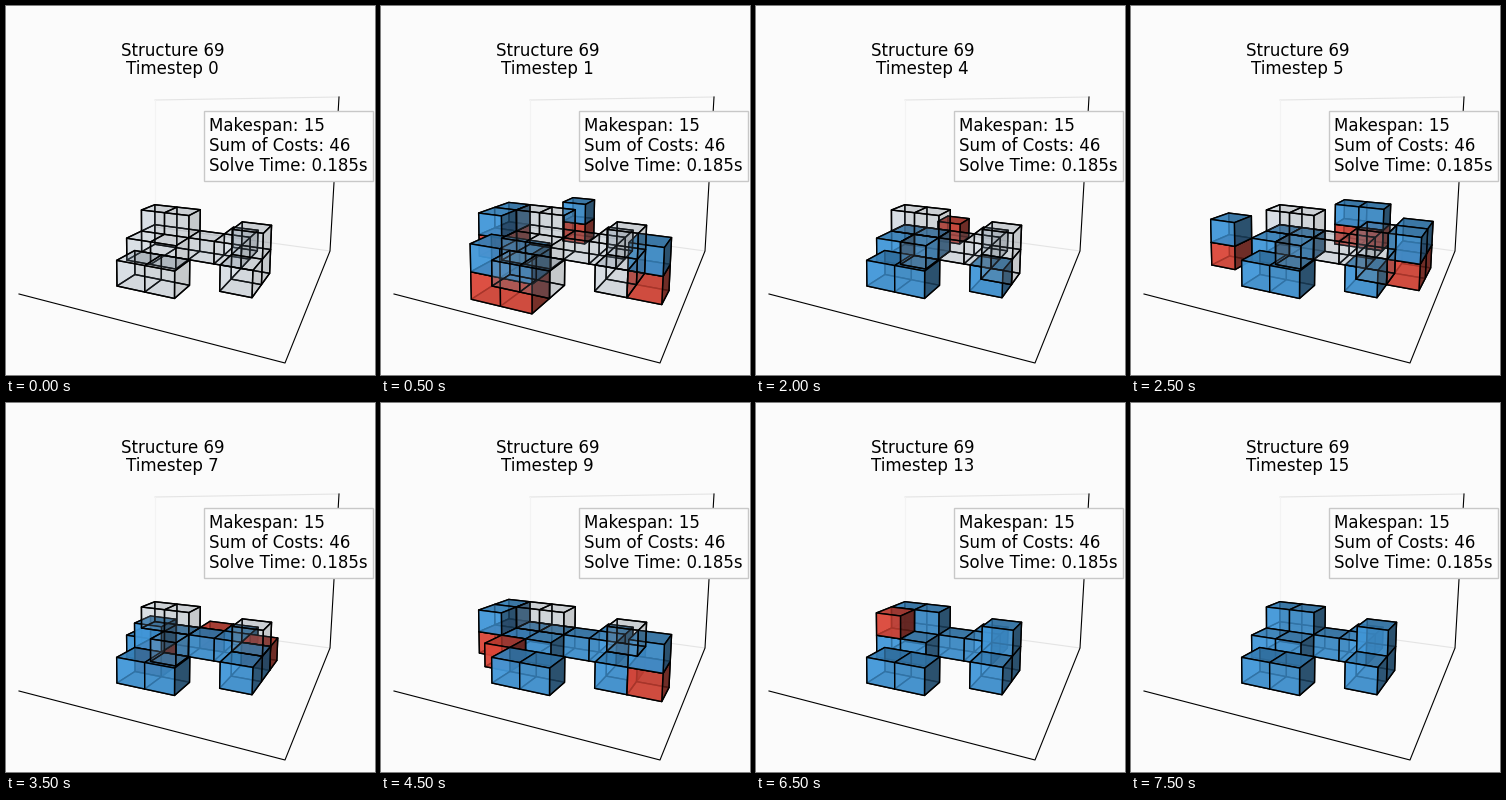
Animation of 369 by 369 pixels, one loop 8000 ms. Source, as a matplotlib script:

```python
import itertools

import numpy as np
import matplotlib.pyplot as plt
from matplotlib.animation import FuncAnimation
from matplotlib.collections import PolyCollection
from matplotlib.patches import Rectangle

SIZE, DPI = 369, 100
STEPS, STEP_MS = 16, 500

# Perspective camera: screen origin, axis vanishing points, and their weights.
ORIGIN = np.array([111, 280, 1])
VANISHING = np.array([[-682, 108, 1], [379, 108, 1], [150, 3100, 1]])
WEIGHTS = np.array([-0.0338, 0.0716, -0.0090])

LEFT, RIGHT, FRONT, BACK = (-1, 0, 0), (1, 0, 0), (0, -1, 0), (0, 1, 0)
DOWN, UP = (0, 0, -1), (0, 0, 1)
FAR_TO_NEAR = [BACK, LEFT, DOWN, UP, RIGHT, FRONT]
LIGHT = np.array([-0.67, -0.67, 0.17])
STYLES = {  # base colour and opacity
    "goal": ((0.58, 0.68, 0.77), 0.15),
    "block": ((0.29, 0.67, 0.96), 0.76),
    "robot": ((0.97, 0.31, 0.25), 0.76),
}


def add(a, b):
    return tuple(p + q for p, q in zip(a, b))


def inside(cell):
    return -2 <= cell[0] <= 4 and -1 <= cell[1] <= 5


class Trip:
    """A robot enters at the border, places a block from one side, and leaves."""

    def __init__(self, start, goal, side, way=None, hold=0):
        stand = add(goal, side)
        outward = [stand]
        cell = add((stand[0], stand[1], 0), way or side)
        while inside(cell):
            outward.append(cell)
            cell = add(cell, way or side)
        inward = [outward[-1]] * hold + outward[::-1]
        self.start, self.goal = start, goal
        self.drop = start + len(inward)
        self.path = inward + outward

    def robot(self, step):
        index = step - self.start
        return self.path[index] if 0 <= index < len(self.path) else None


TRIPS = [
    *(Trip(1, (x, 0, 0), FRONT) for x in (0, 1)),
    *(Trip(1, (-1, y, 0), LEFT) for y in (2, 3)),
    Trip(1, (3, 1, 0), RIGHT),
    Trip(1, (0, 3, 0), BACK),
    *(Trip(5, (x, 5 - x, 0), RIGHT) for x in (2, 3)),
    *(Trip(5, (x, 2 + x, 0), BACK) for x in (1, 2)),
    Trip(5, (0, 2, 0), FRONT, way=LEFT),
    Trip(9, (0, 3, 1), LEFT),
    Trip(9, (3, 2, 1), FRONT, way=RIGHT),
    Trip(9, (-1, 3, 1), FRONT, way=LEFT, hold=2),
]


def cells_at(step):
    cells = {t.goal: "block" if step >= t.drop else "goal" for t in TRIPS}
    for trip in TRIPS:
        robot = trip.robot(step)
        if robot:
            cells[robot] = "robot"
            if step < trip.drop:
                cells[add(robot, UP)] = "block"
    return cells


def project(points):
    screen = ORIGIN + (np.asarray(points) * WEIGHTS) @ VANISHING
    return screen[:, :2] / screen[:, 2:]


def face_corners(cell, normal):
    normal = np.array(normal)
    u, v = np.eye(3)[normal == 0]
    base = np.array(cell) + (normal > 0)
    return [base, base + u, base + u + v, base + v]


def face_color(kind, normal):
    base, alpha = STYLES[kind]
    shade = 0.65 + 0.35 * np.dot(normal, LIGHT)
    return (*(channel * shade for channel in base), alpha)


def build_faces(step):
    cells = cells_at(step)
    # Solid cubes go far to near, then the translucent goals on top.
    order = sorted(cells, key=lambda c: (cells[c] == "goal", -np.dot(c, WEIGHTS)))
    polygons, colors = [], []
    for cell, normal in itertools.product(order, FAR_TO_NEAR):
        kind = cells[cell]
        if cells.get(add(cell, normal)) != kind:
            polygons.append(project(face_corners(cell, normal)))
            colors.append(face_color(kind, normal))
    return polygons, colors


plt.rcParams["font.family"] = "DejaVu Sans"
plt.rcParams["font.size"] = 12
fig = plt.figure(figsize=(SIZE / DPI, SIZE / DPI), dpi=DPI, facecolor="#fbfbfb")
ax = fig.add_axes([0, 0, 1, 1])
ax.set_xlim(0, SIZE)
ax.set_ylim(SIZE, 0)
ax.axis("off")

# Faint pane edges, then the three axis lines.
ax.plot([149, 333], [94, 91], color="#e4e4e4", lw=0.8)
ax.plot([149, 149], [94, 221], color="#f3f3f3", lw=0.8)
ax.plot([149, 324], [221, 245], color="#e4e4e4", lw=0.8)
ax.plot([13, 279, 324, 333], [288, 357, 245, 91], color="black", lw=0.8)

cubes = PolyCollection([], edgecolors="black", linewidths=1, zorder=3)
ax.add_collection(cubes, autolim=False)

ax.add_patch(Rectangle((197.5, 104.5), 169, 70, facecolor="#fcfcfc",
                       edgecolor="#c8c8c8", lw=1, zorder=4))
for row, line in enumerate(("Makespan: 15", "Sum of Costs: 46", "Solve Time: 0.185s")):
    ax.text(202.7, 125 + 20.2 * row, line, zorder=5)
ax.text(166.5, 50.5, "Structure 69", ha="center")
title = ax.text(166.5, 68.5, "", ha="center")


def update(step):
    polygons, colors = build_faces(step)
    cubes.set_verts(polygons)
    cubes.set_facecolor(colors)
    title.set_text(f"Timestep {step}")
    return cubes, title


anim = FuncAnimation(fig, update, frames=STEPS, interval=STEP_MS,
                     repeat=True, repeat_delay=0)
plt.show()
```
